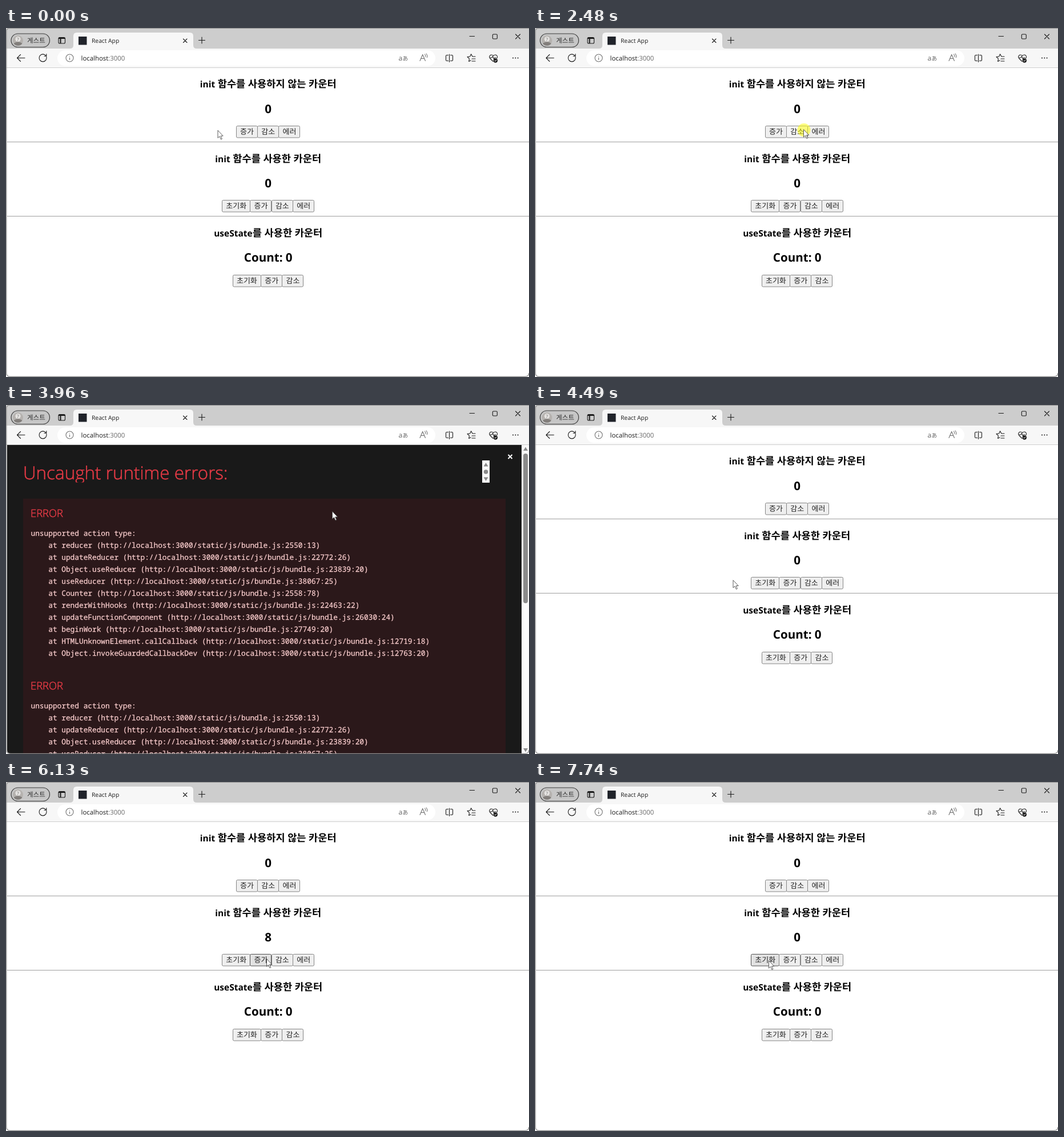
An HTML page that plays this animation: 916x611 px, repeating every 8 s.

```html
<!DOCTYPE html>
<html lang="ko">
<head>
<meta charset="utf-8">
<title>React App</title>
<style>
  html, body { margin: 0; width: 100%; height: 100%; overflow: hidden; background: #fff; }
  svg { display: block; }
  text { font-family: 'Open Sans', 'Noto Sans CJK KR', 'Noto Sans CJK', sans-serif; text-rendering: geometricPrecision; white-space: pre; }
  .mid { text-anchor: middle; }
  .title { font-size: 17.6px; font-weight: 700; }
  .latin { font-size: 15.5px; }
  .count { font-size: 20.6px; font-weight: 700; }
  .btn rect { fill: #efefef; stroke: #858585; }
  .btn text { font-size: 13px; fill: #222; }
  .btn.hover rect { fill: #e2e2e2; stroke: #4f4f4f; }
  .btn.press rect { fill: #f5f5f5; stroke: #8d8d8d; }
  .line { fill: none; stroke: #1b1b1b; stroke-width: 1.1; stroke-linecap: round; stroke-linejoin: round; }
  .soft { stroke: #707070; }
  .red { fill: #e83b46; stroke: #e83b46; stroke-width: .5; font-weight: 300; }
  .head { font-size: 18.4px; }
  .stack { font: 12.81px 'Noto Sans Mono', 'DejaVu Sans Mono', monospace; fill: #fccfcf; stroke: #fccfcf; stroke-width: .25; }
</style>
</head>
<body>
<svg width="916" height="611" viewBox="0 0 916 611">
  <defs>
    <clipPath id="view"><path d="M2 70H916V610H8Q2 610 2 604Z"/></clipPath>
    <clipPath id="header"><rect x="20" y="90" width="800" height="45.5"/></clipPath>
  </defs>

  <rect width="916" height="611" fill="#fff"/>
  <g id="page"></g>

  <g id="errors" clip-path="url(#view)" visibility="hidden">
    <rect y="70" width="916" height="541" fill="#191919"/>
    <text class="red" x="30" y="130" font-size="31.4" clip-path="url(#header)">Uncaught runtime errors:</text>
    <rect x="834" y="97" width="13" height="39" fill="#fafafa"/>
    <path d="M836.5 107.5L840.5 101L844.5 107.5ZM836.5 126.5L840.5 133L844.5 126.5Z" fill="#8b8b8b"/>
    <circle cx="840.5" cy="117" r="3.8" fill="#8b8b8b"/>
    <path d="M879.5 87L886.5 94M886.5 87L879.5 94" stroke="#fff" stroke-width="2"/>
    <rect x="30" y="164" width="845" height="447" fill="#2b181a"/>
    <g id="traces"></g>
    <rect x="903" y="70" width="13" height="541" fill="#fafafa"/>
    <rect x="906" y="85" width="8" height="262" rx="4" fill="#8b8b8b"/>
    <path d="M906 80L910 73.5L914 80ZM906 601L910 607.5L914 601Z" fill="#8b8b8b"/>
  </g>

  <g id="chrome">
    <rect width="916" height="37" fill="#cdcdcd"/>
    <rect y="36" width="916" height="33" fill="#f7f7f7"/>
    <path d="M112 36Q118 36 118 30V14Q118 8 124 8H322Q328 8 328 14V30Q328 36 334 36Z" fill="#f7f7f7"/>
    <path d="M0 69.5H916" stroke="#cfcfcf"/>

    <rect x="9" y="10" width="67.5" height="23.5" rx="11.7" fill="#c6c6c6" stroke="#3c3c3c" stroke-width="1.2"/>
    <circle cx="21" cy="22" r="9" fill="#b5b2af"/>
    <path d="M13.5 27Q21 21.5 28.5 27A9 9 0 0 1 13.5 27" fill="#827e7b"/>
    <circle cx="21" cy="19.5" r="4.6" fill="#e6e4e2"/>
    <text class="mid" x="21" y="22.5" font-size="8" fill="#666">?</text>
    <text x="37" y="25.5" font-size="11.5" fill="#2b2b2b">게스트</text>

    <rect class="line" x="92" y="16.5" width="11.5" height="10.5" rx="2"/>
    <path d="M92 18H103.5M95.5 18V27" stroke="#1b1b1b" stroke-width="2"/>
    <rect x="127" y="15" width="14.5" height="14.5" fill="#20232a"/>
    <text x="150" y="25.7" font-size="10.3" fill="#1b1b1b">React App</text>
    <path class="line" d="M310.5 19L317 25.5M317 19L310.5 25.5M337.5 21.5H348.5M343 16V27"/>
    <path class="line" d="M812 14.5H820.5M892.5 11L900.5 19M900.5 11L892.5 19"/>
    <rect class="line" x="852.3" y="11" width="8" height="8" rx="1.5"/>

    <rect x="90" y="39" width="662" height="27.5" rx="13.7" fill="#fff"/>
    <path class="line" d="M33 52.5H19.5M25.5 46.5L19.5 52.5L25.5 58.5"/>
    <path class="line" d="M70.8 50.5A6.5 6.5 0 1 1 67.5 46.6L70.5 49M70.8 45.5V49.3H67"/>
    <circle class="line soft" cx="111.5" cy="52.5" r="6.5"/>
    <path class="line soft" d="M111.5 52V55.5M111.5 49.5V49.6"/>
    <text x="131.5" y="57" font-size="11.4" fill="#1b1b1b">localhost<tspan fill="#6b6b6b">:3000</tspan></text>
    <text x="687.5" y="56.5" font-size="12" fill="#666">a<tspan font-size="10">あ</tspan></text>
    <path class="line soft" d="M725 57.5L729.7 46.5L734.4 57.5M726.7 53.5H732.7M733.5 46Q735.3 48 734.5 50.3M736 45Q738.6 48 737.3 51.5"/>

    <path class="line" d="M774.5 47.5H772Q770.5 47.5 770.5 49V56Q770.5 57.5 772 57.5H774.5M778.5 47.5H781Q782.5 47.5 782.5 49V56Q782.5 57.5 781 57.5H778.5M776.5 46V59.5"/>
    <path class="line" d="M817 50L814.6 45.7L812.6 50L808 50.6L811.5 53.8L810.6 58.5L814 56.7M817 50H822M816 54H822M816 58H822"/>
    <path class="line" d="M853 58.5L848 53.5C845 50 848.5 44.5 853.5 48.5C858.5 44.5 862.5 50 859.5 53M848 52H851L852.5 49.5L854.5 54L856 52H858"/>
    <circle cx="857.3" cy="57" r="3.7" fill="#1b1b1b"/>
    <path d="M855.5 57L857 58.3L859.2 55.8" fill="none" stroke="#fff"/>
    <path d="M888 52.5H888.01M892.3 52.5H892.31M896.6 52.5H896.61" stroke="#1b1b1b" stroke-width="2" stroke-linecap="round"/>
  </g>

  <path d="M916 .5H6Q.8 .5 .8 6V604Q.8 610.3 7 610.3H909Q915.8 610.3 915.8 604" fill="none" stroke="#8c8c8c" stroke-width="1.2"/>

  <circle id="glow" r="11.5" fill="#ff0" fill-opacity=".5"/>
  <path id="cursor" d="M.5 .7V14L3.5 11.2L5.9 16.5L7.9 15.6L5.6 10.5H9.7Z" fill="#fff" stroke="#4a4a4a" stroke-width=".9" stroke-linejoin="round"/>
</svg>

<script>
const LOOP = 8000, CRASH = 3560, RELOAD = 4490, RESET = 7740;
const $ = id => document.getElementById(id);

function add(parent, tag, attrs = {}, text = '') {
  const el = document.createElementNS('http://www.w3.org/2000/svg', tag);
  for (const key in attrs) el.setAttribute(key, attrs[key]);
  el.textContent = text;
  return parent.appendChild(el);
}

// Counter sections
const page = $('page'), buttons = [];

function section(row, latin, hangul, count, labels) {
  const top = 70 + row * 130.3;
  const title = add(page, 'text', { class: 'title mid', x: 459.2, y: top + 34.2 });
  add(title, 'tspan', { class: 'latin' }, latin);
  add(title, 'tspan', {}, hangul);
  const value = add(page, 'text', { class: 'count mid', x: 459.2, y: top + 78.5 }, count);
  const width = s => s.length * 12 + 13.3;
  let x = 459.2 - labels.reduce((sum, s) => sum + width(s), 0) / 2;
  for (const label of labels) {
    const w = width(label), y = Math.round(top + 101);
    const el = add(page, 'g', { class: 'btn' });
    add(el, 'rect', { x: Math.floor(x) + .5, y: y + .5, width: Math.round(w), height: 20.5, rx: 2 });
    add(el, 'text', { class: 'mid', x: x + w / 2, y: y + 15 }, label);
    buttons.push({ el, x, y, w, h: 21.5 });
    x += w;
  }
  if (row < 2) add(page, 'path', { d: `M2 ${Math.round(top + 129) + .5}H916`, stroke: '#9f9f9f' });
  return value;
}

const first = section(0, 'init', ' 함수를 사용하지 않는 카운터', '0', ['증가', '감소', '에러']);
const second = section(1, 'init', ' 함수를 사용한 카운터', '0', ['초기화', '증가', '감소', '에러']);
section(2, 'useState', '를 사용한 카운터', 'Count: 0', ['초기화', '증가', '감소']);

// Error overlay
const stack = `reducer 2550:13
updateReducer 22772:26
Object.useReducer 23839:20
useReducer 38067:25
Counter 2558:78
renderWithHooks 22463:22
updateFunctionComponent 26030:24
beginWork 27749:20
HTMLUnknownElement.callCallback 12719:18
Object.invokeGuardedCallbackDev 12763:20`.split('\n').map(line => {
  const [name, place] = line.split(' ');
  return `    at ${name} (http://localhost:3000/static/js/bundle.js:${place})`;
});

for (const top of [0, 302]) {
  add($('traces'), 'text', { class: 'red head', x: 43, y: top + 196 }, 'ERROR');
  ['unsupported action type:', ...stack].forEach((line, i) =>
    add($('traces'), 'text', { class: 'stack', x: 43.5, y: top + 229 + i * 20.95 }, line));
}

// Pointer path: time, x, y
const path = [
  [200, 370.5, 178.5], [400, 410, 178], [1160, 409, 178], [1350, 452, 185.5],
  [1490, 452, 185.5], [1620, 470, 182], [1960, 470, 182], [2090, 470, 177],
  [3110, 470, 177], [3430, 497, 185.5], [3770, 497, 185.5], [3960, 571, 185.5],
  [4489, 571, 185.5], [RELOAD, 346.5, 306], [4590, 346.5, 306], [4770, 454, 302],
  [4850, 454, 302], [4970, 463, 301.5], [5050, 463, 301.5], [5110, 456, 309],
  [6260, 456, 309], [6400, 482, 314], [6720, 481, 310], [7200, 480, 310],
  [7400, 440, 315], [7540, 409, 312]
];

function pointer(t) {
  const i = path.findIndex(p => p[0] > t);
  if (i < 1) return path[i ? path.length - 1 : 0].slice(1);
  const [t0, x0, y0] = path[i - 1], [t1, x1, y1] = path[i], k = (t - t0) / (t1 - t0);
  return [x0 + (x1 - x0) * k, y0 + (y1 - y0) * k];
}

// Mouse releases; each follows a short press
const series = (start, gap, n) => Array.from({ length: n }, (_, i) => start + gap * i);
const up1 = [500, 670, 840, 1000, 1150];
const down1 = [1620, 1750, 1960, 2090, ...series(2350, 134, 6)];
const up2 = series(5180, 115, 8);
const down2 = [6460, 6590, 6720, 6860, 7070, 7200];
const clicks = [...up1, ...down1, CRASH, ...up2, ...down2, RESET];

const done = (list, t) => list.filter(c => c <= t).length;

function draw(t) {
  const [x, y] = pointer(t);
  const crashed = t >= CRASH && t < RELOAD;
  const pressed = clicks.some(c => t >= c - 62 && t < c);

  $('errors').setAttribute('visibility', crashed ? 'visible' : 'hidden');
  first.textContent = t < CRASH ? done(up1, t) - done(down1, t) : 0;
  second.textContent = t < RESET ? done(up2, t) - done(down2, t) : 0;

  for (const b of buttons) {
    const over = x >= b.x && x < b.x + b.w && y >= b.y && y < b.y + b.h;
    b.el.setAttribute('class', 'btn' + (over ? pressed ? ' press' : ' hover' : ''));
  }
  $('cursor').setAttribute('transform', `translate(${x} ${y})`);
  $('glow').setAttribute('transform', `translate(${x + 1} ${y + 1.5})`);
  $('glow').setAttribute('visibility', pressed ? 'visible' : 'hidden');
}

const start = performance.now();
function tick() {
  draw((performance.now() - start) % LOOP);
  requestAnimationFrame(tick);
}
tick();
</script>
</body>
</html>
```
